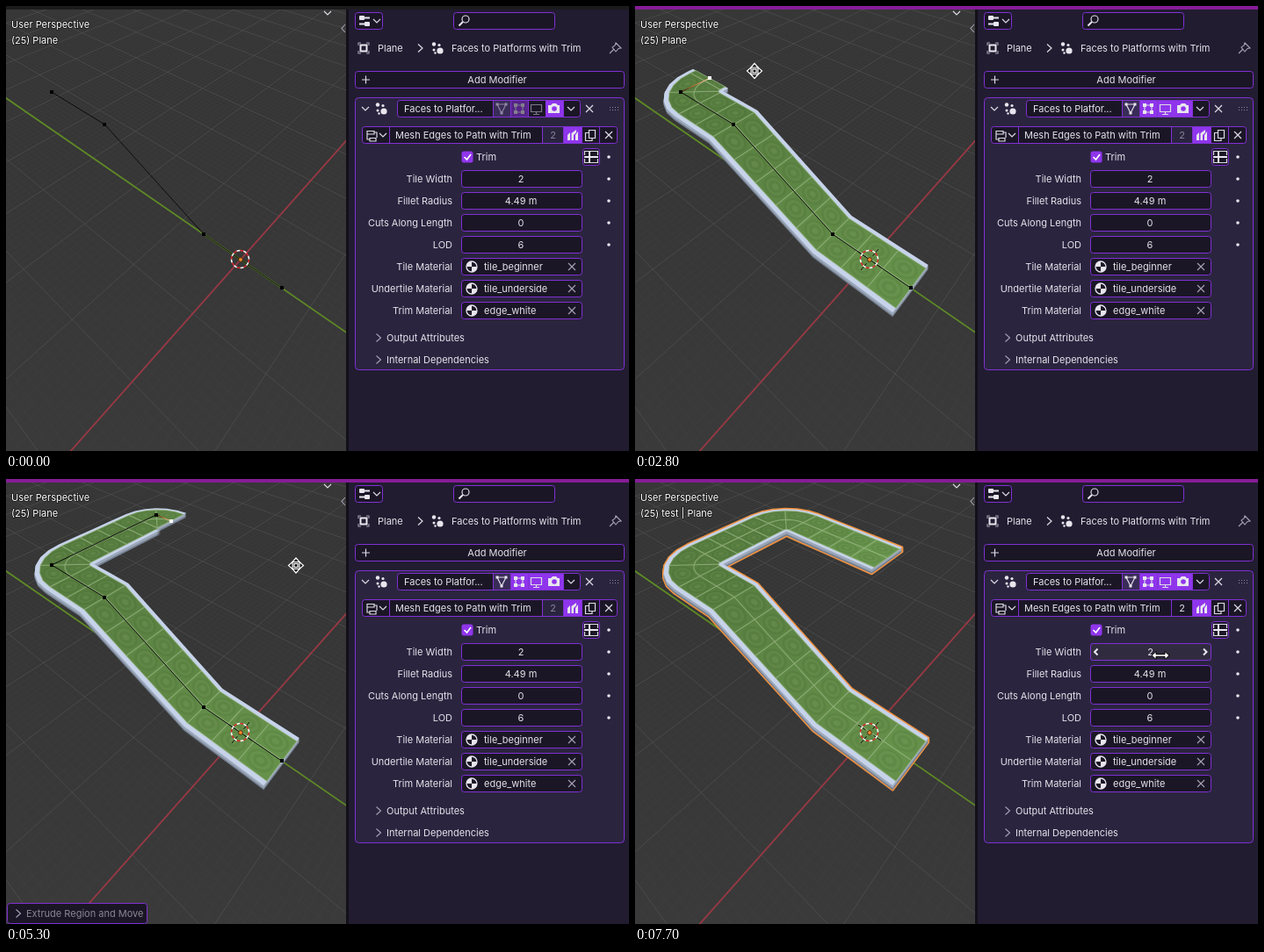
Recreate the animation shown at these times as an HTML page with a canvas. Size 709 by 507 pixels, loop 8000 ms.

```html
<!DOCTYPE html>
<html lang="en">
<head>
<meta charset="utf-8">
<title>Path modifier</title>
<style>
  html, body { margin: 0; width: 709px; height: 507px; overflow: hidden; background: #1e1a2b; }
  canvas, svg { position: absolute; left: 0; top: 0; display: block; }
  text { font: 11px Inter, "Noto Sans", sans-serif; fill: #e4e2ea; white-space: pre; }
  .mid { text-anchor: middle; }
  .end { text-anchor: end; }
  .over { fill: #fff; paint-order: stroke; stroke: #0008; stroke-width: 1.5px; }
  .field { fill: #1b1626; stroke: #7f31d3; }
  .line { fill: none; stroke: #dddbe4; stroke-width: 1.2; }
  .soft { fill: none; stroke: #a7a2b4; stroke-width: 1.1; }
  .bold { fill: none; stroke: #e8e6ee; stroke-width: 2; }
  .white { fill: #e8e6ee; }
  .lit { fill: #8f35ec; }
  .cursor { fill: #fff; stroke: #000; stroke-width: 1; }
</style>
</head>
<body>
<canvas id="view" width="387" height="507"></canvas>
<svg id="ui" width="709" height="507" viewBox="0 0 709 507">
  <defs>
    <path id="down" class="line" d="M-4-2L0 2L4-2"/>
    <path id="next" class="soft" d="M-2.5-4.5L2.5 0L-2.5 4.5"/>
    <path id="close" class="line" d="M-4-4L4 4M4-4L-4 4"/>
    <path id="clear" class="soft" d="M-4-4L4 4M4-4L-4 4"/>
    <g id="nodes" class="white">
      <circle cx="-4" cy="-4.500" r="2.200"/><circle cx="2" cy="-3.500" r="1.600"/><circle cx="-4" cy="2" r="1.500"/>
      <circle cx="3" cy="3" r="3.600"/><circle cx="-2.500" cy="5.500" r="1.200"/>
    </g>
    <g id="ball">
      <circle r="6" fill="#1b1626" stroke="#e8e6ee" stroke-width="1.3"/>
      <path class="white" d="M0 0V-6A6 6 0 0 0-6 0ZM0 0V6A6 6 0 0 0 6 0Z"/>
    </g>
    <path id="tip" d="M0-8.500L4-4H-4Z"/>
  </defs>

  <text class="over" x="6" y="25">User Perspective</text>
  <text class="over" x="6" y="43" id="title"></text>
  <use href="#down" x="366" y="8"/>
  <path class="soft" d="M386 21L382 25.500L386 30"/>
  <g id="op">
    <rect class="field" x="1.500" y="483.500" width="159" height="23" rx="3"/>
    <use href="#next" x="14" y="495"/>
    <text x="23" y="499">Extrude Region and Move</text>
  </g>

  <rect x="387" width="322" height="507" fill="#211c30"/>
  <rect x="387" width="3" height="507" fill="#131018"/>
  <rect id="bar" width="709" height="4"/>

  <rect class="field" x="397.500" y="7.500" width="31" height="19" rx="3"/>
  <path class="bold" d="M402 13.500H414M402 20.500H414"/>
  <rect class="white" x="402" y="11" width="6" height="5" rx="1"/><rect class="white" x="408" y="18" width="6" height="5" rx="1"/>
  <use href="#down" x="422" y="17"/>
  <rect class="field" x="509.500" y="7.500" width="115" height="19" rx="3"/>
  <circle class="line" cx="523" cy="15" r="4"/><path class="bold" d="M520 18L515.500 22.500"/>

  <rect class="bold" x="403.500" y="44.500" width="7" height="7"/>
  <path class="soft" d="M401 45V42H404M410 42H413V45M413 51V54H410M404 54H401V51"/>
  <text x="423" y="52">Plane</text>
  <path class="line" d="M469 43.500L474 48L469 52.500"/>
  <use href="#nodes" x="491" y="48"/>
  <text x="507" y="52">Faces to Platforms with Trim</text>
  <path class="soft" d="M694 42L700 48L697 48.500L694 52L690 47L693 45ZM691.500 49.500L687 54"/>

  <rect class="field" x="397.500" y="74.500" width="306" height="19" rx="3"/>
  <path class="line" d="M405 84H414M409.500 79.500V88.500"/>
  <text class="mid" x="559" y="88">Add Modifier</text>

  <rect x="397.500" y="104.500" width="306" height="310" rx="4" fill="#2b243f" stroke="#7f31d3"/>
  <use href="#down" x="409" y="117"/><use href="#nodes" x="427" y="117"/>
  <rect class="field" x="445.500" y="107.500" width="208" height="19" rx="3"/>
  <text x="453" y="121">Faces to Platfor...</text>
  <rect x="554" y="108" width="20" height="18" fill="#3a2c58"/>
  <g id="modes">
    <rect class="lit" x="574" y="108" width="20" height="18"/>
    <rect class="lit" id="screen" x="594" y="108" width="20" height="18"/>
    <path class="line" d="M559 112H569L564 122Z"/>
    <path class="white" d="M557.500 110.500h3v3h-3zM567.500 110.500h3v3h-3zM562.500 120.500h3v3h-3z"/>
    <path class="line" d="M580 113H588V121H580Z"/>
    <path class="white" d="M578 111h4v4h-4zM586 111h4v4h-4zM578 119h4v4h-4zM586 119h4v4h-4z"/>
    <path class="line" d="M597.500 112.500H609.500V120.500H597.500ZM603.500 121V123M600 123.500H607"/>
  </g>
  <rect class="lit" x="614" y="108" width="20" height="18"/>
  <path class="white" d="M617 113h3l2-2h4l2 2h2v9h-13z"/><circle class="lit" cx="624" cy="117" r="2.800"/>
  <path d="M554.500 108V126M574.500 108V126M594.500 108V126M634.500 108V126" stroke="#7f31d3"/>
  <use href="#down" x="643" y="117"/><use href="#close" x="664" y="117"/>
  <path d="M687 115.500H698M687 118.500H698" stroke="#8b8599" stroke-dasharray="1 2"/>

  <rect class="field" x="405.500" y="137.500" width="290" height="19" rx="3"/>
  <path class="line" d="M411 142.500H419V146H411ZM414 150.500H421V154H414ZM411 146V152H414M419 144H422V150"/>
  <use href="#down" x="429" y="147"/>
  <text x="443" y="151">Mesh Edges to Path with Trim</text>
  <rect id="usersDim" x="611" y="138" width="24" height="18" fill="#2b243f"/>
  <text class="mid" x="622.500" y="151" id="users">2</text>
  <rect class="lit" x="635" y="138" width="20" height="18"/>
  <path class="white" d="M639 153V147L642 144V153ZM643.500 153V145L649 141V144L646 147V153ZM648 153V147L651 143V153Z"/>
  <path class="line" d="M663.500 141.500H670.500V150.500H663.500ZM663 144.500H659.500V153.500H667V151"/>
  <path d="M436.500 138V156M610.500 138V156M634.500 138V156M655.500 138V156M675.500 138V156" stroke="#7f31d3"/>
  <use href="#close" x="686" y="147"/>

  <rect class="lit" x="518.500" y="165.500" width="13" height="13" rx="2.500"/>
  <path d="M521.500 172L524.500 175L529 169" fill="none" stroke="#fff" stroke-width="1.700"/>
  <text x="535" y="176">Trim</text>
  <rect class="field" x="656.500" y="162.500" width="19" height="19" rx="3"/>
  <path class="bold" d="M658 172H674M664 165V179"/>
  <path class="line" d="M658.500 170V165.500H673.500V170M658.500 174V178.500H673.500V174"/>
  <g id="rows"></g>
  <g id="hover">
    <rect x="518.500" y="187.500" width="137" height="19" rx="3" fill="#312b40" stroke="#7f31d3"/>
    <text class="mid" x="586.500" y="201">2</text>
    <path class="bold" d="M526.500 193.500L523 197L526.500 200.500M647 193.500L650.500 197L647 200.500"/>
  </g>
  <use href="#next" x="424" y="378"/><text x="433" y="382">Output Attributes</text>
  <use href="#next" x="424" y="403"/><text x="433" y="407">Internal Dependencies</text>

  <g id="pointer">
    <path class="cursor" data-kind="arrow" d="M0 0V14L3.500 11L6 16L8 15L5.800 10.300L10 10Z"/>
    <g data-kind="cross">
      <path d="M-8 0H-2M2 0H8M0-8V-2M0 2V8" stroke="#000" stroke-width="3.500"/>
      <path d="M-7.500 0H-1M1 0H7.500M0-7.500V-1M0 1V7.500" stroke="#fff" stroke-width="1.600"/>
    </g>
    <g data-kind="move" fill="#000" stroke="#fff" stroke-width="1.200">
      <use href="#tip"/><use href="#tip" transform="rotate(90)"/><use href="#tip" transform="rotate(180)"/><use href="#tip" transform="rotate(270)"/>
      <rect x="-2" y="-2" width="4" height="4"/>
    </g>
    <path class="cursor" data-kind="slide" d="M-10 0L-5-4.500V-1.300H5V-4.500L10 0L5 4.500V1.300H-5V4.500Z"/>
  </g>
</svg>
<script>
const $ = id => document.getElementById(id);
const ctx = $('view').getContext('2d');
const LOOP = 8000, STEP = 100, VIEW_W = 387;

// Panel rows
const rows = [['Tile Width', '2'], ['Fillet Radius', '4.49 m'], ['Cuts Along Length', '0'], ['LOD', '6'],
  ['Tile Material', 'tile_beginner', 1], ['Undertile Material', 'tile_underside', 1], ['Trim Material', 'edge_white', 1]];
$('rows').innerHTML = '<circle class="white" cx="686" cy="172" r="1.8"/>' + rows.map(([label, value, ball], i) => {
  const y = 197 + 25 * i;
  return `<text class="end" x="508" y="${y + 4}">${label}</text>
    <rect class="field" x="518.5" y="${y - 9.5}" width="137" height="19" rx="3"/>` + (ball
    ? `<use href="#ball" x="530" y="${y}"/><text x="544" y="${y + 4}">${value}</text><use href="#clear" x="644" y="${y}"/>`
    : `<text class="mid" x="586" y="${y + 4}">${value}</text><circle class="white" cx="686" cy="${y}" r="1.8"/>`);
}).join('');

// Homogeneous perspective: a point is origin + x * AX + y * AY; one unit is half the path width
const mul = (v, k) => v.map(c => c * k);
const add = (a, b, k = 1) => a.map((c, i) => c + b[i] * k);
const mix = (a, b, u) => a.map((c, i) => c + (b[i] - c) * u);
const AX = mul([722, -224, 1], 0.048), AY = mul([-500, -240, 1], 0.042);
const GROUND = [267, 289, 1], RAISED = mul([52, 98, 1], 1.143);
const at = (o, x, y) => add(add(o, AX, x), AY, y);
const flat = h => [h[0] / h[2], h[1] / h[2]];

function trace(c, pts, close) {
  c.beginPath();
  pts.forEach(p => c.lineTo(p[0], p[1]));
  if (close) c.closePath();
}
function stroke(c, pts, color, width = 1, close = false) {
  trace(c, pts, close);
  c.strokeStyle = color;
  c.lineWidth = width;
  c.stroke();
}
function fill(c, pts, color) {
  trace(c, pts, true);
  c.fillStyle = color;
  c.fill();
}

// A whole ground line, cut to the depths that reach the stage
function groundLine(c, along, offset, color, width) {
  const [fix, run] = along === 'y' ? [AX, AY] : [AY, AX];
  const base = add(GROUND, fix, offset);
  const ends = [0.55, 2.4].map(w => flat(add(base, run, (w - base[2]) / run[2])));
  stroke(c, ends, color, width);
}

function makeFloor() {
  const floor = document.createElement('canvas');
  floor.width = VIEW_W; floor.height = 507;
  const c = floor.getContext('2d');
  const shade = c.createLinearGradient(0, 0, 0, 507);
  shade.addColorStop(0, '#343434');
  shade.addColorStop(1, '#3a3a3a');
  c.fillStyle = shade;
  c.fillRect(0, 0, VIEW_W, 507);
  const meter = 1 / 4.5;
  for (const along of ['x', 'y'])
    for (let n = -150; n <= 270; n++) {
      const major = n % 10 === 0;
      groundLine(c, along, n * meter, major ? 'rgba(86,86,86,.6)' : 'rgba(84,84,84,.15)', 1);
    }
  groundLine(c, 'x', 0, '#983844', 1.8);
  groundLine(c, 'y', 0, '#5f8a25', 1.8);
  return floor;
}
const floor = makeFloor();

// Cross sections along the path: centre, vector to the right edge, tile boundary
const START = -1.374, BEND = 1.38, TOP = -2.68;
function buildPath(p, q) {
  const secs = [];
  const push = (c, r, cut) => secs.push({ c, r, cut });
  const leg = (a, b, r, length) => {
    const n = Math.max(1, Math.round(length / 0.9));
    for (let i = secs.length ? 1 : 0; i <= n; i++) push(mix(a, b, i / n), r, true);
  };
  const arc = (x, y, radius, dir) => {
    for (let i = 1; i <= 6; i++) {
      const [ox, oy] = dir(i / 6 * Math.PI / 2);
      push(at(RAISED, x + radius * ox, y + radius * oy), add(mul(AX, -ox), AY, -oy), i % 3 === 0);
    }
  };
  const r1 = Math.min(1, p), r2 = Math.min(1, q);
  const foot = at(GROUND, 0, BEND), crest = at(RAISED, 0, TOP);
  leg(at(GROUND, 0, START), foot, AX, BEND - START);
  leg(foot, crest, AX, 4.5);
  leg(crest, at(RAISED, 0, -r1), AX, -TOP - r1);
  if (p > 0) {
    arc(r1, -r1, r1, a => [-Math.cos(a), Math.sin(a)]);
    if (p - r2 > r1) leg(at(RAISED, r1, 0), at(RAISED, p - r2, 0), mul(AY, -1), p - r1 - r2);
  }
  if (q > 0) {
    arc(p - r2, -r2, r2, a => [Math.sin(a), Math.cos(a)]);
    if (q > r2) leg(at(RAISED, p, -r2), at(RAISED, p, -q), mul(AX, -1), q - r2);
  }
  return secs;
}

const RINGS = [[0.42, 'rgba(45,80,25,.1)'], [0.33, 'rgba(165,195,130,.12)'],
  [0.23, 'rgba(45,80,25,.12)'], [0.12, 'rgba(165,195,130,.14)']];

function drawPath(p, q, outlined) {
  const secs = buildPath(p, q);
  const edge = d => secs.map(s => flat(add(s.c, s.r, d)));
  const shape = edge(-0.95).concat(edge(1).reverse());
  const drop = dy => shape.map(([x, y]) => [x, y + dy]);
  const spot = (k, d) => {
    const i = Math.min(Math.floor(k), secs.length - 2), u = k - i;
    return flat(add(mix(secs[i].c, secs[i + 1].c, u), mix(secs[i].r, secs[i + 1].r, u), d));
  };
  ctx.lineJoin = 'round';
  if (outlined) for (let dy = 0; dy <= 5; dy++) stroke(ctx, drop(dy), '#f0913f', 3, true);
  for (let dy = 5; dy > 0; dy--) fill(ctx, drop(dy), dy > 3 ? '#758091' : '#9ba7b9');
  fill(ctx, shape, '#c6d3ea');

  const cuts = secs.map((s, i) => s.cut ? i : -1).filter(i => i >= 0);
  for (let n = 0; n + 1 < cuts.length; n++) {
    const a = cuts[n], b = cuts[n + 1];
    const light = n < 8 ? 43 - n * 0.7 : 37 + Math.max(0, n - 15) * 1.2;
    for (const [l, r] of [[-0.79, 0.03], [0.03, 0.85]]) {
      const side = d => Array.from({ length: b - a + 1 }, (_, i) => spot(a + i, d));
      const tile = side(l).concat(side(r).reverse());
      fill(ctx, tile, `hsl(97 32% ${light}%)`);
      for (const [size, color] of RINGS) {
        const ring = Array.from({ length: 18 }, (_, i) => {
          const t = i / 9 * Math.PI;
          return spot(a + (b - a) * (0.5 + size * Math.sin(t)), l + (r - l) * (0.5 + size * Math.cos(t)));
        });
        fill(ctx, ring, color);
      }
      stroke(ctx, tile, 'rgba(160,188,132,.4)', 1.3, true);
    }
  }
}

function drawWire(p, q, selected) {
  const path = [at(GROUND, 0, START), at(GROUND, 0, BEND), at(RAISED, 0, TOP), RAISED];
  if (p > 0) path.push(at(RAISED, p, 0));
  if (q > 0) path.push(at(RAISED, p, -q));
  const pts = path.map(flat);
  stroke(ctx, pts, '#0c0c0c', 1);
  const tip = pts.length - 1;
  if (selected) {
    const [a, b] = [pts[tip - 1], pts[tip]];
    const glow = ctx.createLinearGradient(...a, ...b);
    glow.addColorStop(0, '#3a2c14');
    glow.addColorStop(0.5, '#d08a3c');
    glow.addColorStop(1, '#ffe3bd');
    stroke(ctx, [a, b], glow, 1.2);
  }
  pts.forEach(([x, y], i) => {
    ctx.fillStyle = selected && i === tip ? '#fff' : '#000';
    ctx.fillRect(Math.round(x) - 2, Math.round(y) - 2, 4, 4);
  });
}

function drawOrigin(cross) {
  const [x, y] = GROUND;
  if (cross) for (const [dx, dy] of [[10, -12], [13, 9]])
    for (const s of [-1, 1])
      stroke(ctx, [[x + s * dx * 0.35, y + s * dy * 0.35], [x + s * dx, y + s * dy]], '#111', 1);
  for (let i = 0; i < 16; i++) {
    ctx.beginPath();
    ctx.arc(x - 0.5, y - 0.5, 10, i * Math.PI / 8, (i + 1) * Math.PI / 8);
    ctx.strokeStyle = i % 2 ? '#fff' : '#e0282c';
    ctx.lineWidth = 1.5;
    ctx.stroke();
  }
  ctx.beginPath();
  ctx.arc(x, y, 2.4, 0, 7);
  ctx.fillStyle = '#f08a2e';
  ctx.fill();
  ctx.strokeStyle = '#3a1c08';
  ctx.lineWidth = 0.8;
  ctx.stroke();
}

// Timed tables: time, then values
const mouse = [[100, 650, 20], [500, 612, 105], [700, 601, 116], [1100, 601, 116], [1300, 480, 100], [1500, 250, 82],
  [1700, 120, 86], [1900, 105, 93], [2400, 103, 88], [2800, 136, 74], [3300, 200, 66], [3900, 262, 67], [4600, 293, 68],
  [5100, 300, 72], [5500, 360, 125], [5900, 411, 178], [6400, 452, 214], [6900, 452, 214], [7000, 65, 214],
  [7200, 200, 210], [7600, 598, 201]];
const firstPull = [[2400, 0], [2800, 1.23], [3300, 2.75], [3900, 4.37], [4600, 5.15]];
const lastPull = [[5100, 0], [5400, 1.2], [5900, 3.74], [6400, 4.9]];
function sample(table, t) {
  if (t <= table[0][0]) return table[0].slice(1);
  const i = table.findIndex(row => row[0] >= t);
  if (i < 0) return table[table.length - 1].slice(1);
  const a = table[i - 1], b = table[i];
  return mix(a.slice(1), b.slice(1), (t - a[0]) / (b[0] - a[0]));
}
const within = (t, a, b) => t >= a && t < b;
const show = (node, on) => { node.style.display = on ? '' : 'none'; };

function render(t) {
  const shown = t >= 800, object = t >= 7100;
  const moving = within(t, 2400, 4800) || within(t, 5100, 6500);
  const [p] = sample(firstPull, t), [q] = sample(lastPull, t);

  ctx.drawImage(floor, 0, 0);
  if (shown) drawPath(p, q, object);
  if (within(t, 3500, 4800)) groundLine(ctx, 'x', 0, '#ee747c', 2.2);
  if (within(t, 5400, 6500)) groundLine(ctx, 'y', 0, '#a9d45c', 2.2);
  if (!object) drawWire(p, q, t >= 1800);
  drawOrigin(shown);

  $('title').textContent = object ? '(25) test | Plane' : '(25) Plane';
  $('bar').setAttribute('fill', t < 100 ? '#1b1b1d' : '#861c98');
  $('modes').setAttribute('opacity', shown ? 1 : 0.5);
  show($('screen'), shown);
  show($('usersDim'), !object);
  $('users').setAttribute('opacity', object ? 1 : 0.5);
  show($('op'), within(t, 4800, 7100));
  $('op').lastElementChild.setAttribute('opacity', moving ? 0.55 : 1);
  show($('hover'), t >= 7500);

  let [x, y] = sample(mouse, t);
  if (within(t, 5100, 7000)) x %= VIEW_W;
  const kind = moving ? 'move' : x < VIEW_W ? 'cross' : t >= 7500 ? 'slide' : 'arrow';
  show($('pointer'), t >= 100);
  $('pointer').setAttribute('transform', `translate(${x.toFixed(1)} ${y.toFixed(1)})`);
  for (const part of $('pointer').children) show(part, part.dataset.kind === kind);
}

const began = performance.now();
function tick() {
  const t = (performance.now() - began) % LOOP;
  render(Math.floor(t / STEP) * STEP);
  requestAnimationFrame(tick);
}
tick();
</script>
</body>
</html>
```
